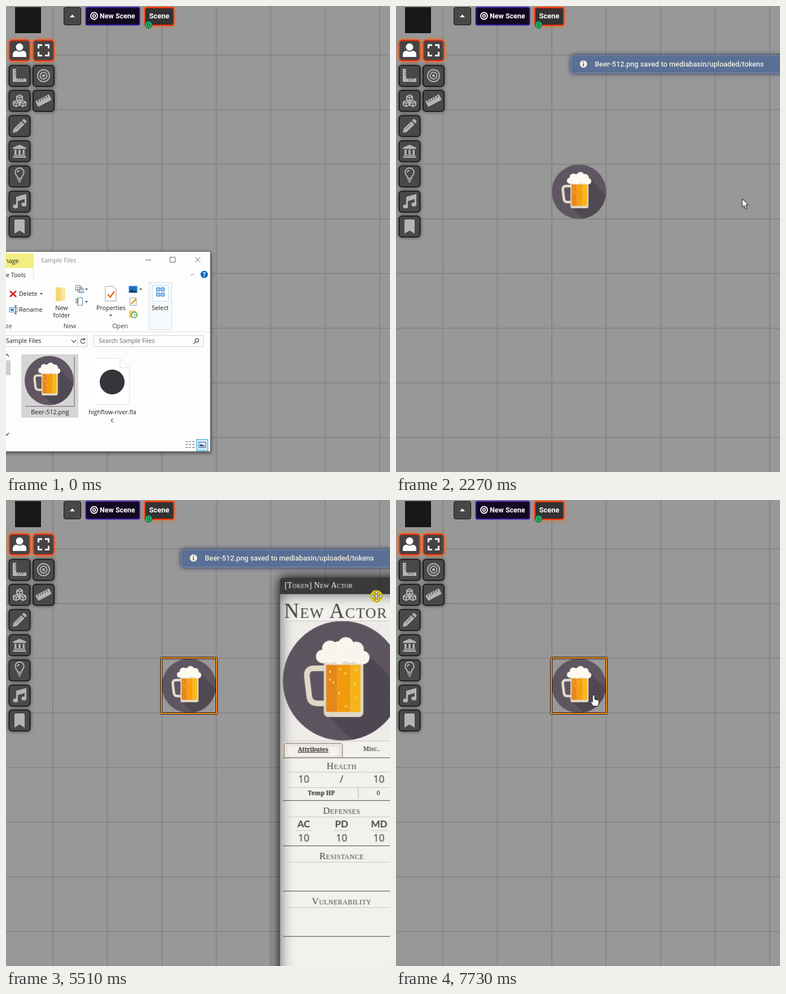
Write an HTML page that moves like this. It is 680 px wide and 823 px high and loops after 8000 ms.

```html
<!DOCTYPE html>
<html lang="en">
<head>
<meta charset="utf-8">
<title>Token drop</title>
<style>
html,body{margin:0;width:100%;height:100%;overflow:hidden;background:#989898}
#stage{position:absolute;inset:0;overflow:hidden;contain:strict}
svg,#sheet{position:absolute;left:0;top:0}
svg{display:block;overflow:hidden}
text{font-family:Roboto,sans-serif;white-space:pre}
.b{font-weight:700}
.m{text-anchor:middle}
.e{text-anchor:end}
.ui text{font:10.8px "Open Sans",sans-serif;fill:#222}
.ui .dim{fill:#8a8a8a}
.glow{filter:drop-shadow(0 0 3px #ff6400)}
.soft{filter:drop-shadow(0 0 3px #0009)}
.deep{filter:drop-shadow(0 0 8px #000)}
.ico{fill:#b4b4b4;stroke:none}
.ln{fill:none;stroke:#b4b4b4;stroke-width:2}
#sheet{width:617px;height:720px;overflow:hidden;border-radius:5px;box-shadow:0 0 20px #000}
#head{height:29px;background:#0000009e}
#paper{position:absolute;inset:29px 0 0;background:#f3f1ee;box-shadow:inset 0 0 24px #0009}
#sheet text{font:11px "Noto Serif",serif;fill:#222}
#sheet .b{font-weight:700}
#sheet .sc{font-family:"Liberation Serif",serif;font-variant:small-caps;font-size:17px;letter-spacing:.4px;fill:#444}
#sheet .num{font:17.5px "Noto Sans",sans-serif;fill:#444}
#sheet .cap{font:700 17px Lato,sans-serif;fill:#444}
#sheet .w{fill:#fff}
#sheet .hd{font-size:12px;fill:#f0f0e0}
</style>
</head>
<body>
<div id="stage">
<svg width="680" height="823">
<defs>
  <pattern id="grid" x="82" y="85.5" width="96.45" height="96.5" patternUnits="userSpaceOnUse">
    <path d="M1 0V96.5M0 1H96.45" stroke="#818181" stroke-width="1.6"/>
  </pattern>
  <pattern id="hatch" width="6" height="6" patternUnits="userSpaceOnUse">
    <path d="M-1 7L7-1M-1 1L1-1M5 7L7 5" stroke="#000" stroke-opacity=".11"/>
  </pattern>
  <clipPath id="disc"><circle r="105.5"/></clipPath>
  <g id="beer">
    <circle r="105.5" fill="#5f5661"/>
    <path d="M47-45L120 28V120H32L-28 60L37-30Z" fill="#504852" clip-path="url(#disc)"/>
    <path d="M-30-22H-50Q-64-22-63-8L-59 26Q-58 40-44 40H-30" fill="none" stroke="#e5dccb" stroke-width="10"/>
    <rect x="-33" y="-42" width="70" height="106" rx="8" fill="#e5dccb"/>
    <path d="M-29-28H-9V55H-29Z" fill="#e88a1c"/>
    <path d="M-9-28H14V55H-9Z" fill="#f59e0c"/>
    <path d="M14-28H32V55H14Z" fill="#fbb718"/>
    <path d="M-22-16h0M-4-20h0M5-13h0M24-19h0M-16 3h0M-6 22h0M22 5h0M24 30h0M6 45h0M-22-2h0" stroke="#fad66b" stroke-width="4" stroke-linecap="round"/>
    <g fill="#fdfaf2">
      <circle cx="-35" cy="-43" r="12"/><circle cx="-22" cy="-57" r="14"/><circle cx="6" cy="-63" r="14"/>
      <circle cx="-6" cy="-57" r="13"/><circle cx="24" cy="-55" r="14"/><circle cx="36" cy="-41" r="12"/>
      <path d="M-38-48L36-52L42-32Q30-26 22-33Q10-30 4-35Q-4-24-14-33Q-26-28-36-36Z"/>
    </g>
  </g>
  <rect id="btn" width="37" height="37" rx="5" fill="#494949" stroke="#111" stroke-width="1.6" class="soft"/>
  <rect id="hot" width="36" height="36" rx="5" fill="#474343" stroke="#ff2d08" stroke-width="2" class="glow"/>
</defs>
<rect width="680" height="823" fill="#989898"/>
<rect width="680" height="823" fill="url(#grid)"/>

<rect x="16" y="2" width="46" height="46" fill="#191818"/>
<rect x="102.5" y="2.5" width="30" height="31" rx="3" fill="#484848" stroke="#111"/>
<path d="M113 20L117.5 15L122 20Z" fill="#fff"/>
<rect x="141.5" y="2.5" width="95" height="31" rx="3" fill="#120820" stroke="#3a18a8" stroke-width="2"/>
<g fill="none" stroke="#fff" stroke-width="1.8"><circle cx="156" cy="17.5" r="6"/><circle cx="156" cy="17.5" r="2.4"/></g>
<text x="166" y="22" font-size="12.5" fill="#fff" class="b">New Scene</text>
<rect x="246" y="3" width="51" height="31" rx="3" fill="#343232" stroke="#ff2d08" stroke-width="2" class="glow"/>
<text x="253.5" y="22" font-size="12.8" fill="#fff" class="b">Scene</text>
<circle cx="252.5" cy="33" r="6.2" fill="#22b573" stroke="#10402a"/>
<text x="252.5" y="36.2" font-size="9" fill="#0c3a24" class="m">G</text>

<use href="#hot" x="6" y="60.5"/><use href="#hot" x="48.5" y="60.5"/>
<use href="#btn" x="5.5" y="105"/><use href="#btn" x="48" y="105"/>
<use href="#btn" x="5.5" y="149"/><use href="#btn" x="48" y="149"/>
<use href="#btn" x="5.5" y="193.5"/><use href="#btn" x="5.5" y="238"/>
<use href="#btn" x="5.5" y="282.5"/><use href="#btn" x="5.5" y="327"/><use href="#btn" x="5.5" y="371"/>
<g fill="#fff"><circle cx="24" cy="72.5" r="6.5"/><path d="M12 90V86Q12 79 19 79Q24 82 29 79Q36 79 36 86V90Z"/></g>
<path d="M57.5 75V69H64M69 69H75.5V75M75.5 81V87.5H69M64 87.5H57.5V81" fill="none" stroke="#fff" stroke-width="3"/>
<path class="ico" d="M12 111H18V128H36V134H12Z"/>
<path d="M15 114h4M15 118h4M15 122h4M22 128v4M26 128v4M30 128v4" stroke="#494949"/>
<g class="ln"><circle cx="66.5" cy="123" r="10.5"/><circle cx="66.5" cy="123" r="6"/></g><circle cx="66.5" cy="123" r="2.5" class="ico"/>
<g class="ln"><path id="cube" d="M24 157L29 159.5V165L24 167.5L19 165V159.5ZM19 159.5L24 162L29 159.5M24 162V167.5"/><use href="#cube" x="-6" y="10"/><use href="#cube" x="6" y="10"/></g>
<g transform="rotate(-28 66.5 167)"><rect class="ico" x="53" y="161.5" width="27" height="11" rx="1.5"/><path d="M57.5 161v5M62 161v5M66.5 161v5M71 161v5M75.5 161v5" stroke="#494949" stroke-width="1.3"/></g>
<path class="ico" d="M12 224L13.5 217L27 203.5L32.5 209L19 222.5ZM28.5 202L30.5 200Q32 199 33.5 200.5L35.5 202.5Q37 204 36 205.5L34 207.5Z"/>
<path d="M17 217.5L28 206.5" stroke="#494949"/>
<path class="ico" d="M24 245L35.5 250V252.5H12.5V250ZM15 254h3.5v8H15zM22.2 254h3.6v8h-3.6zM29.5 254H33v8h-3.5zM14 262.5H34V264.5H14ZM12.5 265.5H35.5V268H12.5Z"/>
<path class="ln" d="M20.5 304Q20.5 301 18 298.5A7.7 7.7 0 1 1 30 298.5Q27.5 301 27.5 304ZM20.5 307H27.5M22 310.5H26M20 294Q20.5 291 24 290.5"/>
<path class="ico" d="M18 337L36 332V351H33V341L21 344.5V354H18Z"/><ellipse class="ico" cx="16.8" cy="354" rx="4.5" ry="3.5"/><ellipse class="ico" cx="31.8" cy="350.5" rx="4.5" ry="3.5"/>
<path class="ico" d="M15 379Q15 377 17 377H31Q33 377 33 379V402L24 396.5L15 402Z"/>

<g id="token">
  <use href="#beer" transform="translate(324 328) scale(.455)"/>
  <g id="red" fill="none"><rect x="275" y="279" width="98" height="98" rx="1" stroke="#1a0a0a" stroke-width="4"/><rect x="275" y="279" width="98" height="98" stroke="#e8222a" stroke-width="2"/></g>
  <g id="amber" fill="none"><rect x="275" y="279" width="98" height="98" rx="1" stroke="#1a1206" stroke-width="4"/><rect x="275" y="279" width="98" height="98" stroke="#ff9829" stroke-width="2"/></g>
</g>

<g id="dialog"><g class="deep">
  <path d="M609 445H760V523H604V450Q604 445 609 445Z" fill="#b9b8b5"/>
  <path d="M609 445H760V473H604V450Q604 445 609 445Z" fill="#3a3a3a"/></g>
  <rect x="611.5" y="482.5" width="150" height="32" rx="3" fill="#d6d4cf" stroke="#77756f"/>
  <text x="611" y="463" font-size="12.5" fill="#f4f4ea" class="b">What Type should this be?</text>
  <text x="675" y="502.5" font-size="12" fill="#222">character</text>
</g>

<g id="files" class="ui">
  <rect x="-20" y="433.5" width="382" height="353.5" fill="#fdfdfd" stroke="#5c5c5c" style="filter:drop-shadow(1px 2px 3px #0008)"/>
  <path d="M0 437H49V463H0Z" fill="#f2ee82"/><path d="M48.5 463V487" stroke="#ddd"/>
  <text x="-2" y="454">nage</text><text x="62" y="453" class="dim">Sample Files</text>
  <text x="0" y="479">e Tools</text>
  <path d="M247 448.5H257M290.5 443.5H299.5V452.5H290.5ZM335 443.5L344 452.5M344 443.5L335 452.5" fill="none" stroke="#666"/>
  <path d="M327 476L330 473L333 476" fill="none" stroke="#888"/>
  <circle cx="351" cy="474" r="6.5" fill="#1068c0"/><text x="351" y="478" class="m" style="fill:#fff;font-weight:700">?</text>
  <path d="M7 503.5L18 513.5M18 503.5L7 513.5" stroke="#d81e1e" stroke-width="2.5"/>
  <text x="23" y="512">Delete</text><text x="23" y="540">Rename</text>
  <path d="M60 507h5l-2.5 3zM140 499h5l-2.5 3zM140 521h5l-2.5 3zM183 545h5l-2.5 3zM236 499h5l-2.5 3zM271 545h5l-2.5 3z" fill="#444"/>
  <path d="M6 532.5H20V540.5H6Z" fill="#fff" stroke="#4a88c8"/><path d="M8 534.5h6v4H8z" fill="#2f80d0"/><path d="M17 530V543M15 529.5h4M15 543.5h4" stroke="#333"/>
  <path d="M88 497H98L105 500V519L98 521H88Z" fill="#f5d678"/><path d="M98 500L105 497V519L98 521.5Z" fill="#fbe6a2"/>
  <text x="98.5" y="537" class="m">New</text><text x="98.5" y="550" class="m">folder</text>
  <g fill="#fff" stroke="#5c7f9c"><path d="M123.5 493.5h8v8h-8zM126.5 496.5h8v8h-8zM129.5 499.5h8v7h-8z"/><path d="M126.5 515.5h9v13h-9z"/></g><path d="M123 518h6M123 521h6M123 524h6" stroke="#444"/>
  <path d="M176 495H190L195 500V521H176Z" fill="#fff" stroke="#999"/><path d="M180 509L184.5 514L192 504" fill="none" stroke="#e8651c" stroke-width="2.5"/>
  <text x="186" y="537" class="m">Properties</text>
  <path d="M217.5 494.5h15v12h-15z" fill="#1d73c9"/><path d="M218 506L223 500L227 504L229 502L232 506Z" fill="#183a50"/>
  <path d="M219.5 515.5h11v13h-11z" fill="#fff" stroke="#999"/><path d="M222 526L231 517" stroke="#e09a2e" stroke-width="2.5"/>
  <path d="M218 538h12v12h-12z" fill="#f0d060"/><circle cx="227" cy="545.5" r="5" fill="#fff" stroke="#3a9a3c" stroke-width="1.5"/><path d="M227 542.5V546H230" fill="none" stroke="#3a9a3c"/>
  <rect x="253.5" y="488.5" width="40" height="83" fill="#f6fafd" stroke="#d4dde4"/><path d="M259.5 493.5h28v28h-28z" fill="#fff" stroke="#c5dcee"/>
  <path d="M266.5 497.5h6v6h-6zM274.5 497.5h6v6h-6zM266.5 506.5h6v6h-6zM274.5 506.5h6v6h-6z" fill="#9ccbf4" stroke="#2f86d0"/>
  <text x="273" y="537" class="m">Select</text>
  <g style="opacity:.85"><text x="-16" y="569">anize</text><text x="113" y="569" class="m">New</text><text x="202" y="569" class="m">Open</text></g>
  <path d="M0 575.5H361" stroke="#e2e2e2"/>
  <path d="M-5 582H143.5V601.5H-5M126.5 582V601.5M155.5 582H349.5V601.5H155.5Z" fill="none" stroke="#d2d2d2"/>
  <text x="0" y="595">Sample Files</text><text x="164" y="595" style="fill:#666">Search Sample Files</text>
  <path d="M116 590L120 594L124 590M139 589A4 4 0 1 0 140 593M139.5 586V589.5H136M332 597L336 593" fill="none" stroke="#555" stroke-width="1.3"/><circle cx="338" cy="590.5" r="3" fill="none" stroke="#555" stroke-width="1.3"/>
  <path d="M0 626H8V652H0Z" fill="#cdcdcd"/><path d="M-2 619L1.5 615L5 619M-2 754L1.5 758L5 754" fill="none" stroke="#555" stroke-width="1.5"/>
  <path d="M27 615H128V727H27Z" fill="#d5d5d5"/><path id="pick" d="M27.5 615.5H127.5V726.5H27.5Z" fill="#cce8ff" stroke="#99d1ff"/>
  <path d="M121 619V707H34" fill="none" stroke="#999" stroke-width="2"/>
  <use href="#beer" transform="translate(76.5 661.5) scale(.412)"/>
  <text x="78" y="721" class="m">Beer-512.png</text>
  <path d="M158 622.5H202L218.5 639V703.5H158Z" fill="#fff"/><path d="M158 622.5H202L218.5 639V703.5H158M202 622.5V639H218.5" fill="none" stroke="#ddd"/>
  <circle cx="188" cy="664" r="22" fill="#38343c"/>
  <text x="188.5" y="721" class="m">highflow-river.fla</text><text x="188" y="735" class="m">c</text>
  <path d="M318 769.5h4M318 774.5h4M318 779.5h4M324 769.5h3.5M324 774.5h3.5M324 779.5h3.5M330 769.5h4M330 774.5h4M330 779.5h4" stroke="#555"/>
  <path d="M337.5 765.5H357.5V785.5H337.5Z" fill="#cce8ff" stroke="#26a0da"/><path d="M341.5 770.5h12v9h-12z" fill="#fff" stroke="#456"/><path d="M343 778v-3l3-2l6 4v1z" fill="#2c6fae"/>
</g>
</svg>

<div id="sheet"><div id="head"></div><div id="paper"></div>
<svg width="617" height="720">
  <text x="8" y="18" class="sc" style="font-size:14px;fill:#fff">[Token] New Actor</text>
  <g fill="#f0f0e0">
    <circle cx="437" cy="13" r="3.5" fill="none" stroke="#f0f0e0" stroke-width="3"/><circle cx="437" cy="13" r="5.5" fill="none" stroke="#f0f0e0" stroke-width="2" stroke-dasharray="2.3 2"/>
    <circle cx="492" cy="12.5" r="6.5"/><path d="M547 6.5h7v2h-1v3l2.5 3h-4v4l-1 1.5l-1-1.5v-4h-4l2.5-3v-3h-1z"/>
    <path d="M566 9L574 17M574 9L566 17" stroke="#f0f0e0" stroke-width="2.8"/>
  </g>
  <circle cx="492" cy="10.5" r="2.2" fill="#3c3c3c"/><path d="M488 16Q492 12 496 16" stroke="#3c3c3c" stroke-width="2" fill="none"/>
  <text x="447" y="17" class="hd">Sheet</text><text x="501" y="17" class="hd">Token</text><text x="577" y="17" class="hd">Close</text>
  <g id="lit" style="filter:drop-shadow(0 0 4px red)"><path d="M566 9L574 17M574 9L566 17" stroke="#f0f0e0" stroke-width="2.8"/><text x="577" y="17" class="hd">Close</text></g>
  <text x="7" y="71" class="sc" style="font-size:37px;letter-spacing:1.5px">New Actor</text>
  <g id="stats"><text x="604" y="50" class="sc e" style="font-size:18.5px">Level I</text><text x="604" y="69" class="sc e" style="font-size:19.5px">Initiative +I</text></g>
  <use href="#beer" transform="translate(110.5 182)"/>
  <rect x="5" y="76" width="211" height="212" fill="url(#hatch)"/>
  <path d="M7.5 317V297Q7.5 292.5 12 292.5H106Q110.5 292.5 110.5 297V317" fill="#e9e4dc" stroke="#7d6b5c"/>
  <rect x="14" y="298" width="90" height="17" rx="5" fill="#f5f2ed"/>
  <text x="58.5" y="307" class="b m" style="font-size:10.4px;text-decoration:underline">Attributes</text><text x="162" y="306" class="m">Misc..</text>
  <path d="M5 318H216M5 393.5H213M5 473.5H213M5 553.5H213M5 633.5H213" stroke="#444"/>
  <path d="M5 76.5H216M5 288.5H216M5 343.5H213M5 370.5H213M5 422.5H213M5 502.5H213M5 582.5H213M28 446.5H56M95 446.5H122M160 446.5H191" stroke="#c9c6c1"/>
  <path d="M216.5 76V720M138.5 372V390" stroke="#aaa"/>
  <path d="M199 551L207 543M203 551L207 547M199 631L207 623M203 631L207 627" stroke="#666"/>
  <g class="m">
    <text x="109" y="338" class="sc">Health</text><text x="109" y="417" class="sc">Defenses</text><text x="109" y="497" class="sc">Resistance</text><text x="109" y="577" class="sc">Vulnerability</text>
    <text x="42" y="362" class="num">10</text><text x="109" y="362" class="num">/</text><text x="175" y="362" class="num">10</text>
    <text x="73" y="384" class="b" style="font-size:10.5px">Temp HP</text><text x="174" y="384">0</text>
    <text x="42" y="441" class="cap">AC</text><text x="109" y="441" class="cap">PD</text><text x="175.5" y="441" class="cap">MD</text>
    <text x="42" y="466" class="num">10</text><text x="109" y="466" class="num">10</text><text x="175" y="466" class="num">10</text>
  </g>
  <path d="M217 76H607V104H217ZM217 149H607V232.5H217Z" fill="#3a3a3a"/>
  <path id="ext" d="M607 76H612V104H607ZM607 149H612V232.5H607Z" fill="#3a3a3a"/>
  <text x="224" y="93" class="b w">Details</text><text x="224" y="165" class="b w">Actions</text><text x="224" y="193" class="b w">Traits</text><text x="224" y="221" class="b w">Nastier Specials</text>
  <g id="adds"><path d="M568 161h11M573.5 155.5v11M568 189h11M573.5 183.5v11M568 217h11M573.5 211.5v11" stroke="#fff" stroke-width="2.5"/>
    <text x="581" y="165" class="w">Add</text><text x="581" y="193" class="w">Add</text><text x="581" y="221" class="w">Add</text></g>
  <g fill="#e9e6e2" stroke="#8d8b88">
    <g><rect x="217.5" y="125.5" width="119" height="22" rx="2"/><path d="M326 133.5h6l-3 5z" fill="#111" stroke="none"/><text x="224" y="140" stroke="none">—</text><text x="217" y="117" stroke="none">Size</text></g>
    <g id="role"><rect x="348.5" y="125.5" width="76" height="22" rx="2"/><path d="M413 133.5h6l-3 5z" fill="#111" stroke="none"/><text x="356" y="140" stroke="none">—</text><text x="349" y="117" stroke="none">Role</text></g>
    <g id="kind"><rect x="481" y="125.5" width="94" height="22" rx="2"/><path d="M564 133.5h6l-3 5z" fill="#111" stroke="none"/><text x="488" y="140" stroke="none">—</text><text x="480" y="117" stroke="none">Type</text></g>
  </g>
  <g id="scroll">
    <path d="M612 29H617V505H612Z" fill="#2e2e2e"/><rect x="612.5" y="29.5" width="4" height="367" rx="2" fill="#782e22" stroke="#ff6400"/>
    <path d="M598 487H617V505H598Z" fill="#222"/><path d="M604 493L612 501M603 497V492H608M613 497V502H608" fill="none" stroke="#f0f0e0" stroke-width="1.8"/>
  </g>
</svg></div>

<svg width="680" height="823">
<g id="note">
  <rect x="310.5" y="87.5" width="400" height="31" rx="4" fill="#5a6f95" stroke="#7f93b8" style="filter:drop-shadow(0 0 4px #1c2c4a)"/>
  <circle cx="332" cy="102.5" r="6.5" fill="#f0f0e0"/><path d="M332 98v2M332 101.5v5" stroke="#5a6f95" stroke-width="2"/>
  <text x="352" y="107" font-size="12.75" font-weight="500" fill="#f0f0e0">Beer-512.png saved to mediabasin/uploaded/tokens</text>
</g>
<g id="cursor">
  <use id="ghost" href="#beer" transform="translate(0 -22) scale(.45)"/>
  <circle id="press" r="11" fill="#e2cc14" opacity=".85"/>
  <path id="arrow" d="M0 0V15L3.5 12L6 18L8.5 17L6 11H10.5Z" fill="#fff" stroke="#111"/>
  <path id="hand" d="M-2 1.5Q0-1 2 1.5V8L8 9.5Q10 10 9.5 13L8 20H-1L-5.5 13Q-6 10.5-2 13Z" fill="#fff" stroke="#111"/>
  <path id="cross" d="M0-10L3.5-6H1V-1H6V-3.5L10 0L6 3.5V1H1V6H3.5L0 10L-3.5 6H-1V1H-6V3.5L-10 0L-6-3.5V-1H-1V-6H-3.5Z" fill="#fff" stroke="#333" stroke-width=".8"/>
</g>
</svg>
</div>

<script>
const LOOP = 8000;
const run = (id, frames) => document.getElementById(id)
  .animate(frames, {duration: LOOP, iterations: Infinity});
const at = (t, style) => ({offset: t / LOOP, ...style});
const move = (id, rows) => run(id, rows.map(([t, x, y]) => at(t, {transform: `translate(${x}px,${y}px)`})));
const fade = (id, prop, rows) => run(id, rows.map(([t, v]) => at(t, {[prop]: v})));
// Toggles at each time; hidden before the first.
const show = (id, ...times) => {
  const first = times[0] === 0 ? 1 : 0;
  const marks = first ? times : [0, ...times];
  run(id, [...marks, LOOP].map((t, i) => at(t, {opacity: (i + first) % 2, easing: 'step-end'})));
};
const shift = (id, dx) => move(id, [[0, 0, 0], [6420, 0, 0], [6420, dx, 0], [LOOP, dx, 0]]);

show('files', 0, 1790);
show('pick', 350, 1000);
show('note', 1150, 5950);
show('dialog', 1120, 1950);
show('token', 2000);
show('red', 2860, 3840);
show('amber', 3840);

move('sheet', [[0, 488, 137], [5510, 488, 137], [5550, 380, 146], [5600, 180, 157], [5660, 54, 161],
  [5690, 54, 161], [5760, 31, 159], [5880, 47, 159], [LOOP, 47, 159]]);
fade('sheet', 'opacity', [[0, 0], [4000, 0], [4200, 1], [6700, 1], [6700, 0], [LOOP, 0]]);
fade('sheet', 'height', [[0, '720px'], [6380, '720px'], [6440, '505px'], [6560, '505px'], [6700, '0px'], [LOOP, '0px']]);
show('scroll', 6420);
show('ext', 0, 6420);
show('lit', 6470, 6700);
shift('adds', -5);
shift('stats', -6);
shift('role', -2);
shift('kind', -3);

move('cursor', [[0, 530, 850], [30, 528, 822], [390, 75, 665], [540, 75, 665], [860, 324, 350], [1000, 324, 350],
  [1330, 478, 420], [1410, 700, 475], [2060, 700, 475], [2400, 560, 258], [2550, 492, 324], [2600, 493, 325],
  [2780, 493, 325], [2980, 200, 258], [3240, 525, 332], [3290, 525, 332], [3380, 595, 350], [3520, 440, 345],
  [3620, 440, 345], [3760, 345, 340], [3950, 345, 340], [4060, 500, 300], [4210, 700, 200], [4919, 700, 165],
  [4920, 636, 165], [4950, 656, 171], [5100, 656, 171], [5140, 640, 166], [5180, 658, 170], [5510, 658, 170],
  [5660, 344, 185], [5690, 344, 185], [5760, 321, 183], [5880, 337, 183], [6000, 337, 183], [6280, 668, 860],
  [6380, 668, 860], [6440, 656, 656], [6478, 628, 186], [6560, 628, 186], [6900, 430, 290], [7170, 330, 330],
  [7220, 330, 330], [7450, 118, 178], [7725, 350, 344], [LOOP, 350, 344]]);
show('ghost', 540, 900);
show('press', 5510, 5900, 6390, 6445);
show('arrow', 30, 2880, 2950, 3060, 3110, 3700, 4050, 4250, 5950, 6460, 6640, 7080, 7290, 7650);
show('hand', 2880, 2950, 3060, 3110, 3700, 4050, 6460, 6640, 7080, 7290, 7650);
show('cross', 4920, 5950);
</script>
</body>
</html>
```
